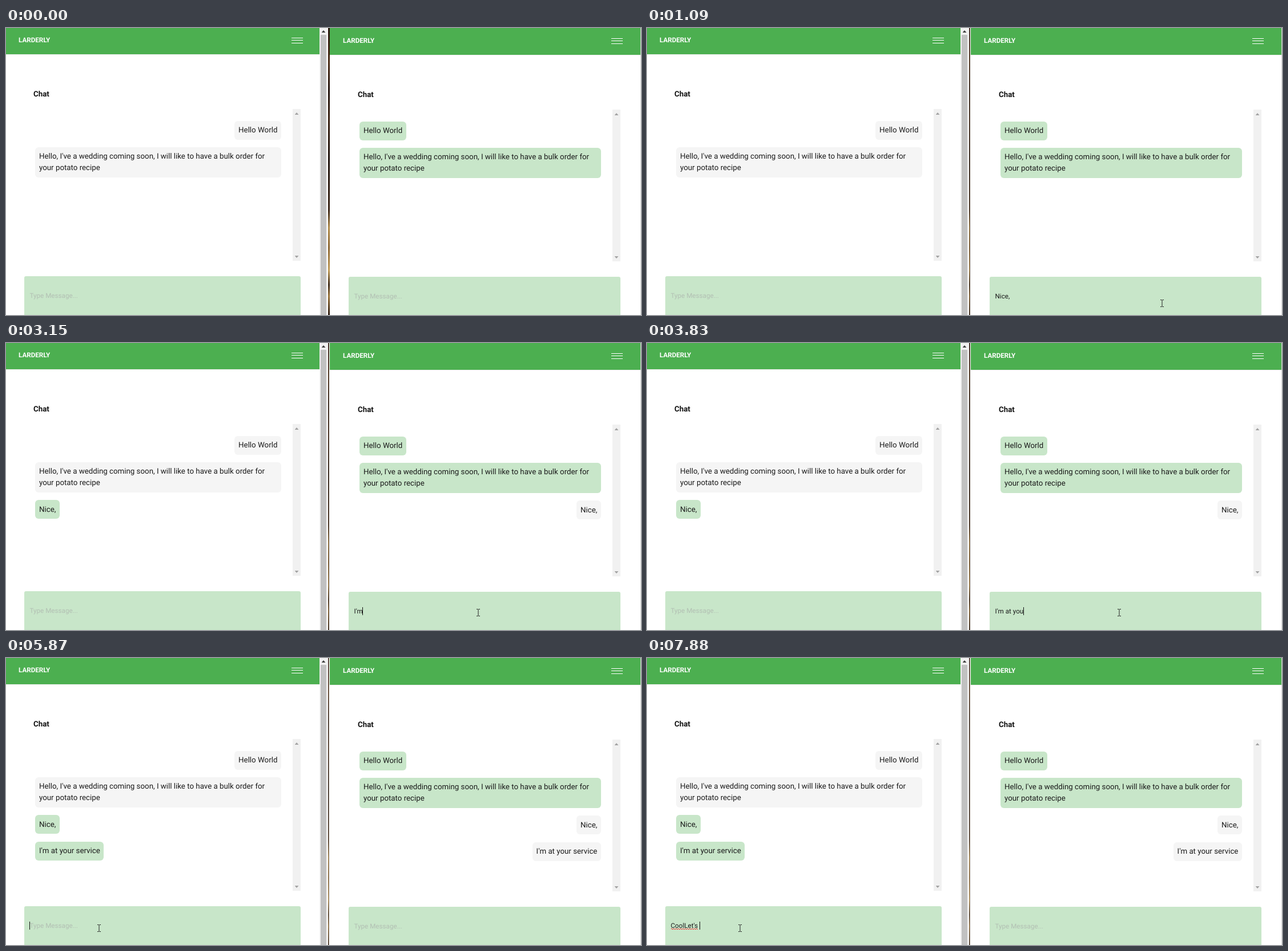
An HTML page that plays this animation: 1112 by 503 pixels, repeating every 8 s.

```html
<!DOCTYPE html>
<html lang="en">
<head>
<meta charset="utf-8">
<title>Two chat windows</title>
<style>
  html, body { margin: 0; width: 100%; height: 100%; overflow: hidden; background: #fff; }
  body { font: 13.3px/20px Roboto, sans-serif; color: #1b1b1b; text-rendering: geometricPrecision; }
  #stage { position: relative; width: 1112px; height: 503px; overflow: hidden; }
  #stage div, #stage svg, .caret, .hint { position: absolute; }

  .pane { top: 0; height: 503px; }
  .left { left: 0; width: 549px; }
  .right { left: 568px; top: 1px; width: 541px; }
  .bar { left: 0; right: 0; top: 0; height: 46px; background: #4caf50; box-shadow: 0 1px 1px #0000000f; }
  .right .bar { left: -1px; right: -2px; top: -1px; height: 47px; }
  .brand { left: 22px; top: 10.5px; font-size: 11.67px; font-weight: 700; color: #fff; }
  .menu { right: 29px; top: 17px; width: 20px; height: 8px; border: solid #fff; border-width: 1px 0; }
  .menu::after { content: ""; position: absolute; top: 3px; width: 20px; height: 1px; background: #fff; }
  .title { left: 48px; top: 107px; font-weight: 700; color: #111; }

  .list { left: 51px; right: 67px; top: 162.5px; display: flex; flex-direction: column; align-items: flex-start; gap: 13.2px; }
  #stage .msg { position: static; padding: 7.6px 6.6px 5.6px 7px; border-radius: 6px; background: #f5f5f5; }
  #stage .msg.end { align-self: flex-end; }
  #stage .msg.green { background: #c8e6c9; }

  .scroll { right: 33px; top: 142px; width: 14px; height: 266px; background: #f1f1f1; }
  .box { left: 31.5px; right: 33px; top: 435px; height: 80px; border-radius: 3px 3px 0 0; background: #c8e6c9; }
  .field { left: 10px; top: 27px; font-size: 11.67px; line-height: 14px; white-space: pre; }
  .hint { left: 0; top: 0; color: #b2bfb3; }
  .text { display: inline-block; height: 14px; vertical-align: top; }
  .caret { width: 1px; height: 14px; margin-left: -.5px; background: #111; }
  .typo {
    display: inline-block; height: 14px;
    background:
      repeating-linear-gradient(90deg, #e33 0 2px, #0000 2px 4px) 0 12px / 100% 1px no-repeat,
      repeating-linear-gradient(90deg, #0000 0 2px, #e33 2px 4px) 0 13px / 100% 1px no-repeat;
  }

  .track { left: 549px; top: 0; width: 14px; height: 503px; background: #f1f1f1; }
  .thumb { left: 2px; top: 12px; width: 10px; height: 491px; background: #c1c1c1; }
  .gap {
    left: 564px; top: 0; width: 3px; height: 503px;
    background: linear-gradient(#24130b, #4b2b14 60px, #20120c 110px, #392012 160px, #1d110c 230px,
      #3a2414 320px, #b08a48 350px, #8a6430 385px, #c09a55 425px, #3b2716 450px, #9a7338 470px, #2a190f 503px);
  }
  .edge { left: 1px; top: 0; width: 2px; height: 503px; }
  .rim { left: 1111px; top: 0; width: 1px; height: 503px; background: #d9d9d9; }
</style>
</head>
<body>
<div id="stage">
  <div class="track"><div class="thumb"></div></div>
  <div class="gap"><div class="edge"></div></div>
  <div class="rim"></div>
  <svg id="pointer" width="7" height="13" fill="none" stroke="#222">
    <path d="M0 .5H2.5M3.5 .5H6M0 12.5H2.5M3.5 12.5H6M3 1V12"/>
  </svg>
</div>
<script>
const LOOP = 8000;
const stage = document.getElementById('stage');
const pointer = document.getElementById('pointer');
const edge = stage.querySelector('.edge');

// text, time it appears, classes on the left, classes on the right
const messages = [
  ['Hello World', 0, 'end', 'green'],
  ["Hello, I've a wedding coming soon, I will like to have a bulk order for your potato recipe", 0, '', 'green'],
  ['Nice,', 1780, 'green', 'end'],
  ["I'm at your service", 5870, 'green', 'end'],
];

// start, side in use, typed text, caret shown, pointer left and top
const steps = [
  [0, 1, '', false, null],
  [200, 1, '', false, [899, 474]],
  [400, 1, 'Nice', false, [899, 476]],
  [1090, 1, 'Nice,', false, [899, 476]],
  [1780, 1, '', true, [899, 476]],
  [2460, 1, '', true, [893, 485]],
  [3150, 1, "I'm", true, [824, 466]],
  [3830, 1, "I'm at you", true, [824, 466]],
  [4500, 1, "I'm at your servi", true, [824, 466]],
  [5190, 1, "I'm at your service", true, [824, 466]],
  [5870, 0, '', true, [160, 467]],
  [6530, 0, 'Cool', true, [160, 467]],
  [7210, 0, 'CoolLet', true, [160, 467]],
  [7880, 0, "CoolLet's ", true, [160, 467]],
];

function add(parent, cls, text = '', tag = 'div') {
  const el = document.createElement(tag);
  el.className = cls;
  el.textContent = text;
  parent.append(el);
  return el;
}

function arrow(parent, top, down, color) {
  const el = add(parent, '');
  el.style.cssText = `left:calc(50% - 3.5px);top:${top}px;width:7px;height:4px;background:${color};` +
    `clip-path:polygon(${down ? '0 0,100% 0,50% 100%' : '0 100%,100% 100%,50% 0'})`;
}

function makePane(side, index) {
  const pane = add(stage, 'pane ' + side);
  add(pane, 'bar');
  add(pane, 'brand', 'LARDERLY');
  add(pane, 'menu');
  add(pane, 'title', 'Chat');
  const list = add(pane, 'list');
  const bubbles = messages.map(m => add(list, 'msg ' + m[2 + index], m[0]));
  const scroll = add(pane, 'scroll');
  arrow(scroll, 6, false, '#a3a3a3');
  arrow(scroll, 257, true, '#a3a3a3');
  const field = add(add(pane, 'box'), 'field');
  return {
    bubbles,
    hint: add(field, 'hint', 'Type Message...', 'span'),
    text: add(field, 'text', '', 'span'),
    caret: add(field, 'caret', '', 'span'),
  };
}

const panes = ['left', 'right'].map(makePane);
arrow(stage.querySelector('.track'), 4, false, '#404040');
stage.append(pointer);

function show(el, on) {
  el.style.visibility = on ? 'visible' : 'hidden';
}

function setText(el, text) {
  if (el.textContent === text) return;
  el.textContent = '';
  if (text.endsWith("'s ")) {
    add(el, 'typo', text.trimEnd(), 'span');
    el.append(' ');
  } else {
    el.textContent = text;
  }
}

// The strip between the windows gets thinner once the right one has focus.
function edgeColor(t) {
  if (t < 400) return 'none';
  const rim = t < 5870 ? '#5b4a3a' : '#8e8071';
  return `linear-gradient(90deg, ${rim} 50%, #fff 50%)`;
}

function draw(now) {
  const t = now % LOOP;
  const [, active, typed, caret, spot] = steps.findLast(s => s[0] <= t);
  panes.forEach((pane, i) => {
    const text = i === active ? typed : '';
    setText(pane.text, text);
    show(pane.hint, !text);
    show(pane.caret, i === active && caret);
    pane.bubbles.forEach((b, k) => show(b, t >= messages[k][1]));
  });
  show(pointer, spot);
  if (spot) {
    pointer.style.left = spot[0] + 'px';
    pointer.style.top = spot[1] + 'px';
  }
  edge.style.background = edgeColor(t);
}

const start = performance.now();
function tick() {
  draw(performance.now() - start);
  requestAnimationFrame(tick);
}
tick();
</script>
</body>
</html>
```
